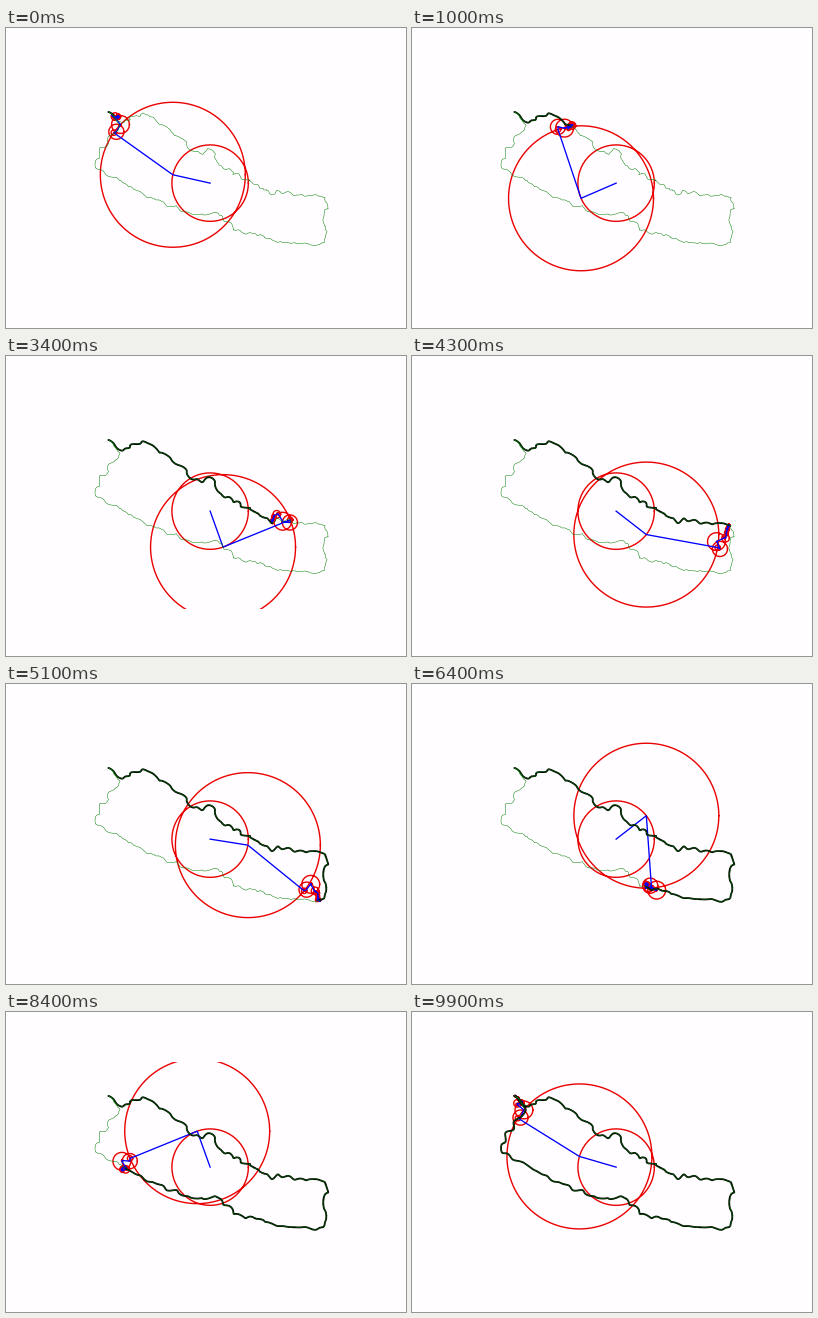
Recreate the animation shown at these times as a matplotlib script. Size 400x300 px, loop 10 s.

```python
import numpy as np
import matplotlib.pyplot as plt
from matplotlib.animation import FuncAnimation

W, H, DPI = 400, 300, 100
STEPS = 100
SUB = 5          # trace points per step
ORDER = 60       # circles turning each way
SAMPLES = 400
TAU = 2 * np.pi

# Border key points, passed at equal time intervals.
KEYS = [
    103 + 84j, 115 + 94j, 125 + 90j, 139 + 86j, 153 + 95j, 166 + 104j,
    179 + 114j, 190 + 125j, 206 + 123j, 213 + 137j, 225 + 143j, 235 + 149j,
    246 + 154j, 257 + 161j, 266 + 165j, 279 + 164j, 295 + 168j, 309 + 167j,
    321 + 174j, 318 + 193j, 320 + 210j, 311 + 217j, 295 + 215j, 280 + 215j,
    263 + 211j, 250 + 206j, 234 + 204j, 221 + 194j, 210 + 185j, 194 + 187j,
    178 + 183j, 163 + 177j, 148 + 171j, 133 + 164j, 120 + 156j, 105 + 148j,
    90 + 139j, 94 + 125j, 103 + 111j, 113 + 97j,
]


def spline(keys, count):
    """Closed Catmull-Rom curve through the keys."""
    keys = np.array(keys)
    seg, u = np.divmod(np.arange(count) * len(keys) / count, 1)
    seg = seg.astype(int)
    a, b, c, d = (keys[(seg + k) % len(keys)] for k in (-1, 0, 1, 2))
    return b + u / 2 * (c - a + u * (2 * a - 5 * b + 4 * c - d
                                     + u * (3 * (b - c) + d - a)))


def wiggle(count, low, high, rms, rng):
    """Closed random ripple with frequencies from low to high."""
    ripple = np.zeros(count, complex)
    band = np.arange(low, high)
    for k in np.append(band, -band):
        ripple += np.exp(1j * TAU * (k * np.arange(count) / count + rng.random()))
    return ripple * rms / np.sqrt(2 * len(band))


rng = np.random.default_rng(7)
outline = (spline(KEYS, SAMPLES)
           + wiggle(SAMPLES, 28, 60, 1.1, rng)
           + wiggle(SAMPLES, 60, 150, .45, rng))

spectrum = np.fft.fft(outline) / SAMPLES
freqs = np.array([k for n in range(1, ORDER + 1) for k in (-n, n)])
coefs = spectrum[freqs]
radii = np.abs(coefs)
ring = np.append(np.exp(1j * TAU * np.linspace(0, 1, 121)), np.nan)


def joints(t):
    """Centre of every circle, followed by the pen tip."""
    spin = coefs * np.exp(1j * TAU * freqs * t)
    return np.cumsum(np.append(spectrum[0], spin))


path = np.array([joints(t)[-1] for t in np.linspace(0, 1, STEPS * SUB + 1)])

fig = plt.figure(figsize=(W / DPI, H / DPI), dpi=DPI, facecolor="#fffdff")
left, right, top, bottom = 50, 360, 50, 253
ax = fig.add_axes([left / W, 1 - bottom / H, (right - left) / W, (bottom - top) / H])
ax.set_xlim(left, right)
ax.set_ylim(bottom, top)
ax.axis("off")

circles, = ax.plot([], [], color="#ea0000", lw=1, zorder=2)
arms, = ax.plot([], [], color="blue", lw=.95, zorder=3)
trace, = ax.plot([], [], color="black", lw=1.3, zorder=4)
closed = np.append(outline, outline[0])
ax.plot(closed.real, closed.imag, color="green", lw=.35, zorder=5)


def put(line, z):
    line.set_data(z.real, z.imag)


def update(i):
    step = i + 1
    pts = joints(step / STEPS)
    put(circles, (pts[:-1, None] + radii[:, None] * ring).ravel())
    put(arms, pts)
    put(trace, path[:step * SUB + 1])
    return circles, arms, trace


anim = FuncAnimation(fig, update, frames=STEPS, interval=100,
                     repeat=True, repeat_delay=0, blit=False)
plt.show()
```
